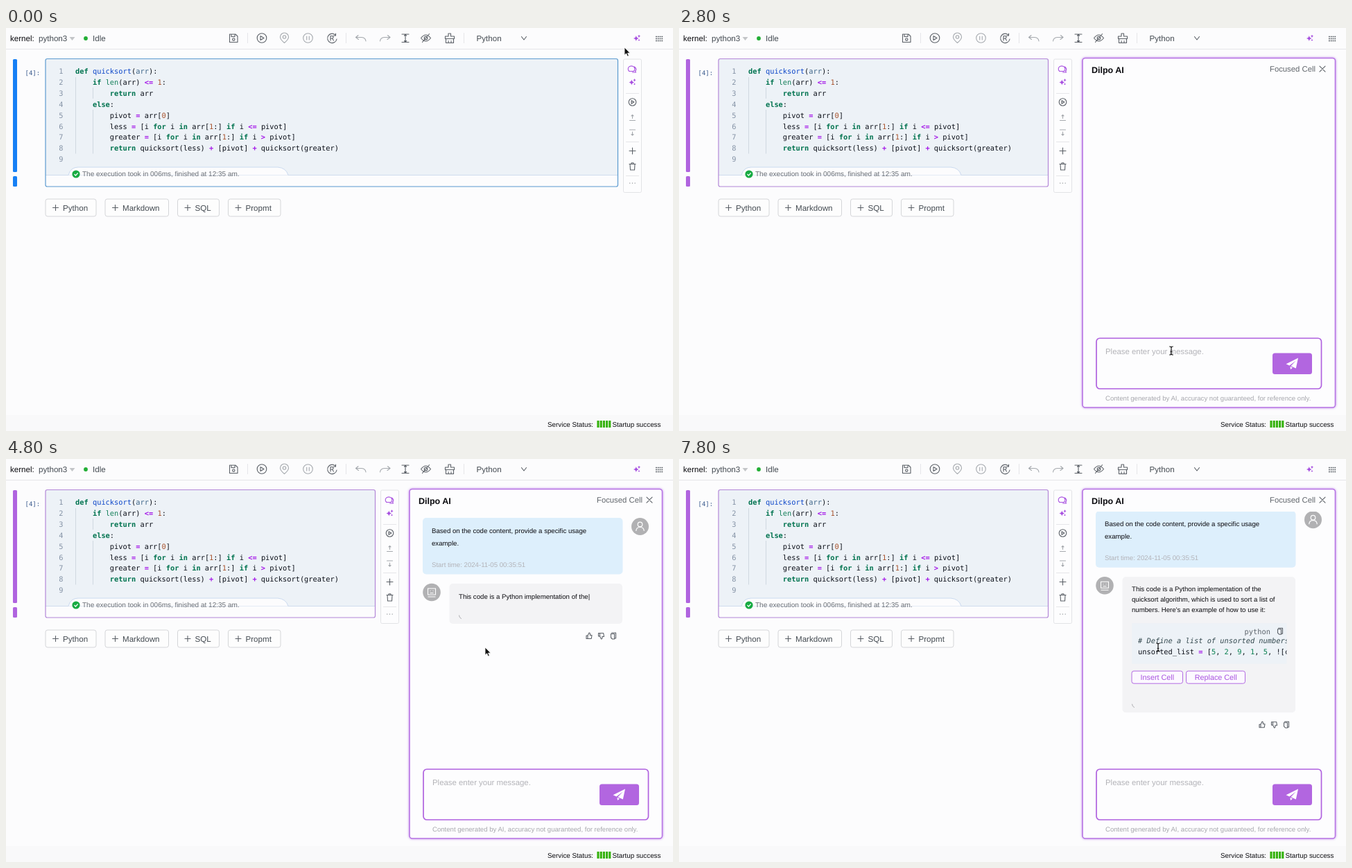
These frames come from a looping animation (962x582 px, 8 s). An HTML page:

```html
<!DOCTYPE html>
<html lang="en">
<head>
<meta charset="utf-8">
<title>Notebook cell chat</title>
<style>
  html, body { margin: 0; width: 100%; height: 100%; overflow: hidden; background: #fcfcfd; }
  svg { display: block; }
  text { font-family: "Liberation Sans", Arial, sans-serif; text-rendering: geometricPrecision; white-space: pre; fill: #444b52; }
  .ui { font-size: 11.6px; }
  .small { font-size: 9.65px; }
  .mono { font-family: "DejaVu Sans Mono", monospace; font-size: 10.35px; fill: #0b0f18; }
  .dark { fill: #0c0c10; }
  .gray { fill: #b3b3b8; }
  .num { fill: #8593a6; text-anchor: end; }
  .kw { fill: #00734f; font-weight: bold; }
  .fn { fill: #0d47c9; }
  .arg { fill: #3e6689; }
  .bi { fill: #15805a; }
  .op { fill: #a417e8; font-weight: bold; }
  .lit { fill: #a8512a; }
  #codeText .lit { fill: #0a8052; }
  .com { fill: #33484e; font-style: italic; }
  .icon { fill: none; stroke: #5b6067; stroke-width: 1.1; stroke-linecap: round; stroke-linejoin: round; }
  .icon .pale, .pale { stroke: #a5a9ae; }
  .violet { stroke: #a74fe0; }
  .fillViolet { fill: #a74fe0; stroke: none; }
  .rule { stroke: #e6e6e9; fill: none; }
  .btn { fill: #fdfdfd; stroke: #d5d6d9; }
  .pbtn { fill: #fcf9ff; stroke: #b36ae2; }
  .ptext { fill: #a852df; }
</style>
</head>
<body>
<svg id="stage" width="962" height="582" viewBox="0 0 962 582">
  <defs>
    <path id="spark" d="M-1.2-3.6Q-.6-.3 2.8.4-.6 1.1-1.2 4.4-1.8 1.1-5.2.4-1.8-.3-1.2-3.6ZM3-5Q3.3-3.2 5-2.8 3.3-2.4 3-.6 2.7-2.4 1-2.8 2.7-3.2 3-5ZM3 1.4Q3.2 2.8 4.6 3 3.2 3.2 3 4.6 2.8 3.2 1.4 3 2.8 2.8 3 1.4Z"/>
    <g id="copy"><path d="M-2.5-4.5H3.5V3.5H1.5M-3.5-3H1.5V4.5H-1.5L-3.5 2.5Z"/></g>
    <path id="thumb" d="M-4-.5H-2V4H-4ZM-2-.5 0-4.5Q2-4.5 1.3-1H4L3.2 4H-2"/>
    <clipPath id="pane"><rect x="584" y="76" width="361" height="366"/></clipPath>
    <clipPath id="codeClip"><rect x="653" y="240" width="223.5" height="70"/></clipPath>
    <filter id="glow" x="-5%" y="-5%" width="110%" height="110%"><feGaussianBlur stdDeviation="1.6"/></filter>
  </defs>

  <rect width="962" height="582" fill="#fcfcfd"/>
  <rect y="559" width="962" height="23" fill="#f9f9fa"/>
  <path class="rule" d="M0 30.5H962"/>

  <g class="ui">
    <text class="dark" x="6" y="18.6">kernel</text><text class="dark" x="37.5" y="18.6">:</text>
    <text x="47" y="18.6">python3</text>
    <path d="M91.5 13H99.500L95.500 18Z" fill="#c3c5c8"/>
    <circle cx="115" cy="15" r="2.9" fill="#22ae35"/>
    <text x="125" y="18.6" fill="#777">Idle</text>
    <text x="678.500" y="18.6">Python</text>
  </g>
  <path class="rule" d="M348.500 7V22M490.500 7V22M660.500 7V22"/>
  <g class="icon">
    <path d="M322.500 9H331L334 12V20.500H322.500ZM325 9V12.500H330V9"/><circle cx="328.300" cy="16.400" r="1.700"/>
    <circle cx="369" cy="14.500" r="6.800"/><path d="M367 11.500 372 14.500 367 17.500Z"/>
    <g class="pale"><path d="M401.500 21.500Q395.500 16.500 395.500 13A6 6 0 0 1 407.500 13Q407.500 16.500 401.500 21.500Z"/><circle cx="401.500" cy="13" r="2.200"/>
    <circle cx="435.500" cy="14.500" r="6.800"/><path d="M433.700 12V17M437.300 12V17"/></g>
    <path d="M475.500 10.500A6.700 6.700 0 1 0 477 16M475.500 8V11H472.500M468 18V11.500H471Q473.200 13.200 471 15H468M470.500 15 472.500 18"/>
    <path class="pale" d="M508 10.500 504.500 13.500 508.500 16.500M504.500 13.500H513Q518.500 14 519 19M550.500 10.500 554 13.500 550 16.500M554 13.500H545.500Q540 14 539.500 19"/>
    <path d="M571 9H581M571 20.500H581M576 9V20.500M574.500 11 576 9.500 577.500 11M574.500 18.500 576 20 577.500 18.500"/>
    <path d="M598.500 14.500Q605.500 5.500 612.500 14.500 605.500 23.500 598.500 14.500ZM600.500 20.500 610.500 8.500"/><circle cx="605.500" cy="14.500" r="2.300"/>
    <path d="M638 8H641.500V12H646.500V15.500H633.500V12H638ZM634.500 15.500V21.500H645.500V15.500M638 18.500V21.500M642 18.500V21.500"/>
    <path d="M743.500 12.500 747 17 750.500 12.500"/>
  </g>
  <use href="#spark" x="910" y="14.500" class="fillViolet"/>
  <path d="M937 12.500H947.500M937 15.500H947.500M937 18.500H947.500" stroke="#555b62" stroke-width="1.300" stroke-dasharray="1.800 1"/>

  <g id="bars"><rect x="10" y="45" width="6" height="163" rx="1.500"/><rect x="10" y="214" width="6" height="15" rx="1.500"/></g>
  <text class="mono" x="27.500" y="67.500" style="font-size:9px;fill:#37588c">[4]:</text>
  <rect id="cellFill" x="57" y="45" height="167" fill="#edf2f7"/>
  <path id="cellRule" stroke="#cfdced"/>
  <path d="M90 212.500Q93 201 104 201H392Q404 202 407 212.500Z" fill="#fcfcfd"/>
  <path d="M90 212.500Q93 201 104 201H392Q404 202 407 212.500" fill="none" stroke="#cbdaf0"/>
  <rect id="cellEdge" x="57" y="44.500" height="184.500" rx="2.500" fill="none" stroke-width="1.200"/>
  <path d="M100.500 71V181.500M125.500 86V102M125.500 118V181.500" stroke="#d0d8e0"/>
  <g id="source"></g>
  <circle cx="101" cy="211" r="5.600" fill="#17ab42"/>
  <path d="M98.500 211 100.400 213 103.700 209.300" fill="none" stroke="#fff" stroke-width="1.200"/>
  <text x="110" y="214.300" style="font-size:10.030px;fill:#6a6f76">The execution took in 006ms, finished at 12:35 am.</text>
  <g id="adders" class="ui"></g>

  <g id="tools">
    <rect x="890.500" y="45" width="26" height="192.500" rx="2" fill="#fdfdfe" stroke="#e2e3e6"/>
    <rect id="hover" x="891" y="46" width="25" height="23" fill="#f0f0f3"/>
    <path class="rule" d="M894 94.500H913M894 164.500H913M894 213.500H913"/>
    <g class="icon">
      <path class="violet" d="M899 62.500A4.800 4.300 0 1 1 905 62.500H898.500M906.500 56Q910.500 60 907.500 62L908.500 64H903.500"/>
      <circle cx="903.500" cy="107" r="5.300"/><path d="M902 104.700 905.800 107 902 109.300Z"/>
      <path class="pale" d="M899.500 133.500H907.500M903.500 130.500V125.500M902 127 903.500 125.500 905 127M899.500 147H907.500M903.500 150V155M902 153.500 903.500 155 905 153.500"/>
      <path d="M899 177.500H908M903.500 173V182M899 196.500H908M902 196V194.800H905V196M900 196.500 900.500 205H906.500L907 196.500"/>
      <path d="M899.700 224H899.800M903.400 224H903.500M907.100 224H907.200"/>
    </g>
    <use href="#spark" x="903.500" y="78" class="fillViolet"/>
  </g>
  <g id="tip">
    <rect x="824" y="44.500" width="57" height="27.500" rx="4" fill="#393d40"/>
    <path d="M881 54.500 885 58 881 61.500Z" fill="#393d40"/>
    <text x="832" y="61.700" style="font-size:10px;fill:#fff">Cell Chat</text>
  </g>

  <g id="panel">
    <rect x="582" y="43.500" width="364.500" height="504.500" rx="4" fill="none" stroke="#cda0f0" stroke-width="2.500" filter="url(#glow)"/>
    <rect x="582" y="43.500" width="364.500" height="504.500" rx="4" fill="#fdfdfe" stroke="#b673e3" stroke-width="1.600"/>
    <text class="dark" x="595" y="65" style="font-size:12.500px;font-weight:bold">Dilpo AI</text>
    <text x="852" y="63" style="font-size:11.300px;fill:#60656b">Focused Cell</text>
    <path class="icon" d="M924 55.200 932 63.200M932 55.200 924 63.200"/>

    <g clip-path="url(#pane)"><g id="feed">
      <g id="ask">
        <rect x="601" y="85" width="288.500" height="81.500" rx="5" fill="#ddeffc"/>
        <g class="small"><text class="dark" x="614" y="107">Based on the code content, provide a specific usage</text>
        <text class="dark" x="614" y="124.500">example.</text>
        <text class="gray" x="614" y="156.300">Start time: 2024-11-05 00:35:51</text></g>
        <circle cx="914.500" cy="97.500" r="12.500" fill="#b1b1b3"/>
        <g fill="none" stroke="#fff" stroke-width="1.200"><circle cx="914.500" cy="94.500" r="3.300"/><path d="M908.700 104Q909 98.500 914.500 98.500T920.300 104"/></g>
      </g>
      <g id="reply">
        <circle cx="614" cy="192.500" r="12.800" fill="#b1b1b3"/>
        <path d="M608.500 187H619.500V196H608.500ZM611.500 190.500H612.500M615.500 190.500H616.500M611.500 193.500H616.500M608.500 199H619.500" fill="none" stroke="#fff" stroke-width="1.100"/>
        <rect id="bubble" x="639.500" y="180" width="249.500" rx="5" fill="#f3f3f5"/>
        <g id="prose" class="small"></g>
        <g id="snippet">
          <rect id="codeBox" x="653" y="247" width="223.500" fill="#edf2f7"/>
          <text class="mono" x="815.500" y="263" style="fill:#5e656d">python</text>
          <use href="#copy" class="icon" x="867" y="258.500"/>
          <g id="codeText" class="mono" clip-path="url(#codeClip)"></g>
          <g id="codeBtns" style="font-size:10.800px">
            <rect class="pbtn" x="653" y="300" width="73.500" height="18" rx="3"/><text class="ptext" x="665.500" y="312.900">Insert Cell</text>
            <rect class="pbtn" x="731.500" y="300" width="85" height="18" rx="3"/><text class="ptext" x="743.700" y="312.900">Replace Cell</text>
          </g>
        </g>
        <g id="foot" class="icon">
          <path d="M653.500-12Q653.500-9 656.500-7.500" stroke="#a3a3a8" stroke-width=".9"/>
          <use href="#thumb" x="841" y="17.500"/>
          <use href="#thumb" transform="translate(858.500 17.500) scale(1 -1)"/>
          <use href="#copy" x="876" y="17.500"/>
        </g>
      </g>
    </g></g>

    <rect x="602" y="448" width="324.500" height="73" rx="5" fill="#fdfdfe" stroke="#b062df" stroke-width="1.700"/>
    <text id="hint" class="gray" x="615" y="470.500" style="font-size:11.400px">Please enter your message.</text>
    <g id="draft" style="font-size:11.400px"><text class="dark" x="615" y="470.500">Based on the code content, provide a</text><text class="dark" x="615" y="488">specific usage example.</text></g>
    <rect x="856" y="469.500" width="57" height="30.500" rx="3.500" fill="#b266e0"/>
    <path d="M893 476.500 875.500 485.300 880.500 487.500 889.500 480.500 882.500 488.300 889.800 491.500ZM881.500 489 885 490.500 882 493Z" fill="#fff"/>
    <text class="gray" x="615" y="538.300" style="font-size:9.600px;fill:#a7a7ad">Content generated by AI, accuracy not guaranteed, for reference only.</text>
  </g>

  <g style="font-size:9.840px">
    <text class="dark" x="781" y="575.700">Service Status:</text>
    <path d="M854 567V577M858.200 567V577M862.400 567V577M866.600 567V577M870.800 567V577" stroke="#35b20d" stroke-width="3.100"/>
    <text class="dark" x="874.500" y="575.700">Startup success</text>
  </g>

  <path id="arrow" d="M0 0V11.200L2.600 8.800 4.400 13 6.300 12.200 4.500 8.200H8Z" fill="#111" stroke="#fff" stroke-width=".8"/>
  <path id="beam" d="M-2.800-6Q0-6 0-4.500 0-6 2.800-6M0-4.500V4.500M-2.800 6Q0 6 0 4.500 0 6 2.800 6M-1.300 1.500H1.300" fill="none" stroke="#111" stroke-width="1.200"/>
</svg>
<script>
const $ = id => document.getElementById(id);
const show = (id, on) => $(id).style.display = on ? "" : "none";
const move = (id, x, y) => $(id).setAttribute("transform", `translate(${x} ${y})`);
const set = (id, attrs) => { for (const k in attrs) $(id).setAttribute(k, attrs[k]); };
const span = (cls, s) => `<tspan class="${cls}">${s.replace(/</g, "&lt;")}</tspan>`;

const TOKENS = /(#.*)|\b(def|if|else|return|for|in)\b|\b(len)\b|(<=|[=+>])|\b(\d+)\b/g;
const STYLES = ["com", "kw", "bi", "op", "lit"];
const highlight = s => s.replace(TOKENS, (m, ...groups) => span(STYLES[groups.findIndex(g => g)], m));

const SOURCE = `def quicksort(arr):
    if len(arr) <= 1:
        return arr
    else:
        pivot = arr[0]
        less = [i for i in arr[1:] if i <= pivot]
        greater = [i for i in arr[1:] if i > pivot]
        return quicksort(less) + [pivot] + quicksort(greater)
`.split("\n");

$("source").innerHTML = SOURCE.map((line, i) => {
  const y = 66 + i * 15.9;
  const code = i ? highlight(line)
    : span("kw", "def") + " " + span("fn", "quicksort") + "(" + span("arg", "arr") + "):";
  return `<text class="mono num" x="82.500" y="${y}" style="fill:#8593a6">${i + 1}</text><text class="mono" x="100" y="${y}">${code}</text>`;
}).join("");

$("adders").innerHTML = [["Python", 57, 73], ["Markdown", 143, 91.5], ["SQL", 247.5, 60], ["Propmt", 320.5, 75.5]]
  .map(([label, x, w]) => `<rect class="btn" x="${x}" y="247" width="${w}" height="25" rx="3"/>
    <path class="icon" d="M${x + 10.500} 259.500h8m-4-4v8"/><text x="${x + 25}" y="263.500">${label}</text>`).join("");

const PROSE = ["This code is a Python implementation of the",
  "quicksort algorithm, which is used to sort a list of",
  "numbers. Here's an example of how to use it:"];
const CODE = ["# Define a list of unsorted numbers", "unsorted_list = [5, 2, 9, 1, 5, "];

// Piecewise linear value at t from [time, value] stops
function along(stops, t) {
  const i = stops.findIndex(s => s[0] > t);
  if (i < 0) return stops[stops.length - 1][1];
  if (i === 0) return stops[0][1];
  const [t0, v0] = stops[i - 1], [t1, v1] = stops[i];
  return v0 + (v1 - v0) * (t - t0) / (t1 - t0);
}

// The first n characters of a list of lines
function take(lines, n) {
  const out = [];
  for (const line of lines) {
    if (n <= 0) break;
    out.push(line.slice(0, n));
    n -= line.length;
  }
  return out;
}

const PROSE_LENGTH = PROSE.join("").length;
const TYPED = [[4000, 0], [4800, 43], [6800, PROSE_LENGTH + 18], [7800, PROSE_LENGTH + CODE.join("").length]];
const MOUSE_X = [[0, 892], [200, 892], [800, 903], [1800, 903], [2400, 710], [4000, 710], [4600, 691]];
const MOUSE_Y = [[0, 28], [200, 28], [800, 56], [1800, 56], [2400, 466], [4000, 466], [4600, 272]];

function drawReply(t) {
  const n = Math.round(along(TYPED, t));
  const prose = take(PROSE, n), code = take(CODE, n - PROSE_LENGTH);
  const last = Math.max(prose.length, 1) - 1, inProse = !code.length;
  if (!prose.length) prose.push("");
  $("prose").innerHTML = prose.map((line, i) => {
    const y = 200.8 + i * 15 + (inProse && i === last ? 1 : 0);
    return `<text class="dark" x="653" y="${y}">${line}${inProse && i === last ? "|" : ""}</text>`;
  }).join("");
  $("codeText").innerHTML = code.map((line, i) => {
    const tail = i === code.length - 1 ? "![cursor](https:" : "";
    const body = i ? highlight(line) + tail : span("com", line + tail);
    return `<text class="mono" x="662" y="${275.700 + i * 16}">${body}</text>`;
  }).join("");
  const extra = code.length > 1 ? 16 : 0;
  const bottom = inProse ? 223 + prose.length * 15 : 360 + extra;
  show("snippet", !inProse);
  set("codeBox", { height: 42.5 + extra });
  move("codeBtns", 0, extra);
  set("bubble", { height: bottom - 180 });
  move("foot", 0, bottom);
  move("feed", 0, extra ? -9.8 : 0);
  return !inProse;
}

function render(now) {
  const t = Math.floor((now % 8000) / 200) * 200;
  const open = t >= 1600, hovering = t >= 800 && !open;
  const width = open ? 475.5 : 825.5;
  set("bars", { fill: open ? "#b064df" : "#1680f5" });
  set("cellFill", { width });
  set("cellEdge", { width, stroke: open ? "#b387d8" : "#5b9ad0" });
  set("cellRule", { d: `M57 212.500h${width}` });
  move("tools", open ? -350 : 0, 0);
  show("hover", hovering);
  show("tip", hovering);
  show("panel", open);

  const drafting = t >= 3200 && t < 3600;
  show("draft", drafting);
  show("hint", !drafting);
  show("ask", t >= 3600);
  show("reply", t >= 4000);
  const overCode = drawReply(t);

  const x = along(MOUSE_X, t), y = along(MOUSE_Y, t);
  const beam = overCode || (t >= 2400 && t < 3000);
  move("arrow", x, y);
  move("beam", x, y);
  show("beam", beam);
  show("arrow", !beam && (t < 800 || (t >= 1800 && t < 2400) || t >= 4200));
}

const start = performance.now();
(function tick() {
  render(performance.now() - start);
  requestAnimationFrame(tick);
})();
</script>
</body>
</html>
```
